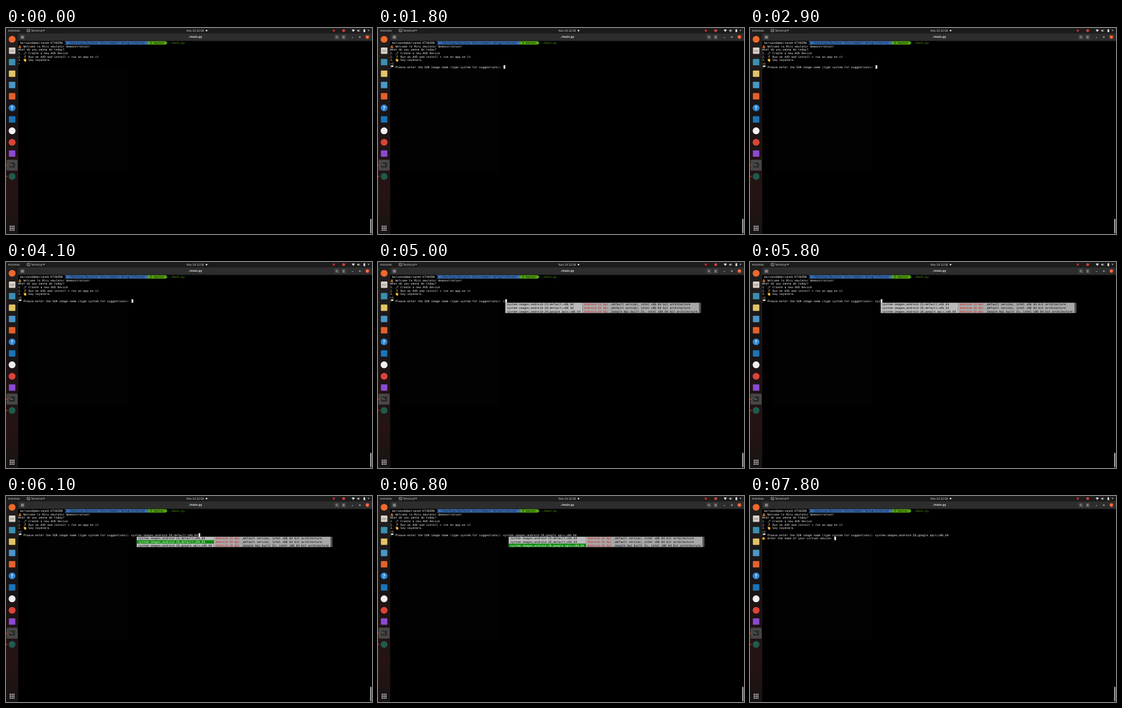
An HTML page that plays this animation: 600 px wide and 338 px high, repeating every 8000 ms.

```html
<!DOCTYPE html>
<html lang="en">
<head>
<meta charset="utf-8">
<title>Terminal session</title>
<style>
  html, body { margin: 0; width: 100%; height: 100%; overflow: hidden; background: #000; }
  svg { display: block; width: 600px; height: 338px; }
  text { white-space: pre; text-rendering: geometricPrecision; }
  .ui { font: 4.7px "Open Sans", "Noto Sans", sans-serif; fill: #e6e6e6; }
  .title { font-weight: 700; }
  .help { font: 700 8px "Open Sans", sans-serif; fill: #fff; }
  .term { font: 4.676px "DejaVu Sans Mono", monospace; }
  .line { fill: none; stroke: #ddd; stroke-width: .6; }
</style>
</head>
<body>
<svg viewBox="0 0 600 338">
  <defs>
    <linearGradient id="dock" x2="0" y2="1">
      <stop offset="0" stop-color="#231f1f"/>
      <stop offset=".4" stop-color="#191314"/>
      <stop offset=".8" stop-color="#261313"/>
      <stop offset="1" stop-color="#181313"/>
    </linearGradient>
  </defs>
  <rect width="600" height="338"/>
  <rect x="36" y="66" width="164" height="170" fill="#020203"/>

  <!-- top panel -->
  <rect width="600" height="9" fill="#1c1c1c"/>
  <g class="ui">
    <text x="3.5" y="6">Activities</text>
    <text x="41" y="6">Terminal</text>
    <text x="296" y="6">Nov 24 22:58</text>
  </g>
  <rect class="line" x="34.6" y="2.2" width="4.6" height="4" rx=".5"/>
  <path class="line" d="M35.6 3.3l1 .9-1 .9M37 5.2h1.3"/>
  <path d="M61 3.3h2.6l-1.3 1.9zM593 3.3h2.6l-1.3 1.9z" fill="#ddd"/>
  <circle cx="328.8" cy="4.2" r="1.2" fill="#fff"/>
  <rect x="535.7" y="2.6" width="3.4" height="3.4" rx="1" fill="#c9252d"/>
  <circle cx="553.6" cy="4.3" r="2.3" fill="#db4437"/>
  <path d="M566.8 3.2q2.5-1.8 5 0l-2.5 3.4zM575.8 3.5h1.2l1.4-1.3v4.4L577 5.2h-1.2z" fill="#ddd"/>
  <path class="line" d="M579.3 2.8q1.2 1.5 0 3"/>
  <path d="M586 2.4h.8v-.6h1.2v.6h.8v4.4H586z" fill="#ddd"/>

  <!-- window title bar -->
  <rect x="20" y="9" width="580" height="12.3" fill="#2d2d2d"/>
  <path d="M20 21.1h580" stroke="#171717" stroke-width=".5"/>
  <g fill="#3b3b3b">
    <rect x="22.6" y="10.8" width="8.4" height="8.4" rx="1.2"/>
    <rect x="538.2" y="10.8" width="8.6" height="8.4" rx="1.2"/>
    <rect x="549.2" y="10.8" width="8.6" height="8.4" rx="1.2"/>
  </g>
  <path class="line" d="M25 13.3h3.7v3.5H25zM26.8 14.2v1.8M25.9 15.1h1.8M543.3 15.8l1.4 1.4M551.8 13.5h3.4M551.8 15h3.4M551.8 16.5h3.4M566.7 15.7h2.6M579.2 14h1.8v1.8h-1.8z"/>
  <circle class="line" cx="542.2" cy="14.6" r="1.4"/>
  <circle cx="592.4" cy="14.8" r="3.1" fill="#e0522a"/>
  <path class="line" d="M591.3 13.7l2.2 2.2M593.5 13.7l-2.2 2.2"/>
  <text class="ui title" x="310.3" y="16.4" text-anchor="middle">./main.py</text>

  <!-- dock -->
  <rect y="9" width="20" height="329" fill="url(#dock)"/>
  <rect x="1" y="216" width="18" height="18" rx="1.5" fill="#474444"/>
  <g id="icons"></g>
  <rect x="4.8" y="32" width="10.6" height="10.4" rx="1.2" fill="#d9d2c9"/>
  <path d="M6.5 36h7v3.2h-7z" fill="#b9aea3"/>
  <text class="help" x="10" y="134" text-anchor="middle">?</text>
  <rect x="4.6" y="220" width="11" height="9.8" rx="1.2" fill="#2c2c2c" stroke="#666" stroke-width=".5"/>
  <path class="line" d="M6.3 222.4l1.6 1.3-1.6 1.3M8.6 225.4h2.4"/>
  <path d="M1.2 225.2h.01M1.2 243.5h.01" stroke="#d9431e" stroke-width="1.8" stroke-linecap="round"/>
  <path d="M6.1 325.4h8M6.1 328.5h8M6.1 331.6h8" stroke="#eee" stroke-width="1.8" stroke-dasharray="1.8 1.2"/>

  <rect x="597.3" y="313" width="1.7" height="24" rx=".8" fill="#d0d0d0"/>
  <g id="prompt" class="term"></g>
  <g id="session" class="term"></g>
</svg>
<script>
const LOOP = 8000, CELL = 2.815, ROW = 5.65;
const colX = c => 20 + c * CELL, rowY = r => 21.6 + r * ROW;
const byId = id => document.getElementById(id);

const text = (c, r, s, fill = '#f2f2f2') =>
  `<text x="${colX(c)}" y="${rowY(r) + 4.4}" fill="${fill}">${s.replace(/>/g, '&gt;')}</text>`;
const block = (c, r, w, fill, h = 1) =>
  `<rect x="${colX(c)}" y="${rowY(r)}" width="${w * CELL}" height="${h * ROW}" fill="${fill}"/>`;
const arrow = (c, r, fill) =>
  `<path d="M${colX(c)} ${rowY(r)}l${CELL} ${ROW / 2}l${-CELL} ${ROW / 2}z" fill="${fill}"/>`;
// Small pictogram on a 5.6 unit square
const glyph = (c, r, body) => `<g transform="translate(${colX(c)} ${rowY(r)})">${body}</g>`;
const fill = (d, color) => `<path d="${d}" fill="${color}"/>`;
const stroke = (d, color, w) =>
  `<path d="${d}" fill="none" stroke="${color}" stroke-width="${w}" stroke-linecap="round"/>`;

// Dock launchers: shape, centre y, colour
byId('icons').innerHTML = [
  ['o', 18.5, '#ee6a2c'], ['s', 56, '#3a8fb0'], ['s', 75, '#e3c468'], ['s', 93.5, '#4a97c9'],
  ['s', 112, '#e2622b'], ['o', 131, '#2f86d4'], ['s', 150, '#1a74b8'], ['o', 168.7, '#f0f0f0'],
  ['o', 187.5, '#db4437'], ['s', 206, '#8b4ad0'], ['o', 243.5, '#1f5a4c']
].map(([shape, y, color]) => shape === 'o'
  ? `<circle cx="10" cy="${y}" r="5.6" fill="${color}"/>`
  : `<rect x="4.7" y="${y - 5.3}" width="10.6" height="10.6" rx="1" fill="${color}"/>`).join('');

const BLUE = '#3a70b8', GREEN = '#55a510';
byId('prompt').innerHTML =
  text(1, 0, 'morvanek@morvanek-KT482RN') +
  block(27, 0, 48, BLUE) + arrow(27, 0, '#000') +
  text(29, 0, '~/Desktop/Emulator-Environment-Setup/internal', '#0a0a0a') +
  block(75, 0, 11, GREEN) + arrow(75, 0, BLUE) + arrow(86, 0, GREEN) +
  glyph(77, 0, stroke('M.7 1v3.6M2.2 1.4v.8l-1.5 1.2', '#0a0a0a', .5)) +
  text(79, 0, 'master', '#0a0a0a') + text(88, 0, './main.py', GREEN) +
  glyph(0, 1, fill('M2.8.2L5.4 5.3H.2z', '#d9862e') + fill('M2 2.2h1.6v1.4H2z', '#a33b2a')) +
  text(3, 1, 'Welcome to Mini emulator demonstration!') +
  text(0, 2, 'What do you wanna do today?') +
  text(0, 3, '1.    Create a new AVD Device') +
  glyph(3, 3, stroke('M1 4.7L3.8 1.7M3.4 1l1.4 1.3', '#a9b0b5', .9)) +
  text(0, 4, '2.    Run an AVD and install + run an app on it') +
  glyph(3, 4, `<circle cx="3" cy=".9" r=".7" fill="#e6b64c"/>` +
    stroke('M2.8 1.9v1.5l1 1.6M2.8 3.4L1.6 4.8M1.7 2.5h2.2', '#c98d3e', .6)) +
  text(0, 5, '3.    Say sayonara.') +
  glyph(3, 5, fill('M.6 1l1-.5 1.2 1.1.7-.9.8.4.7 2.4-.8 1.7-1.6.2-1.6-1.6z', '#f3c036')) +
  text(0, 6, '>');

const choices = [['23', 'default'], ['28', 'default'], ['28', 'google_apis']].map(([api, kind]) => ({
  name: `system-images;android-${api};${kind};x86_64`,
  label: `Android-${api} Api`,
  note: `,${kind === 'default' ? 'default version' : 'Google Api built In'}, intel x86 64 bit architecture`
}));

function menu(col, selected) {
  const rows = choices.map(({ name, label, note }, i) => {
    const r = 8 + i, on = i === selected;
    return (on ? block(col, r, 45, '#0b8a0b') : '') + text(col + 1, r, name, on ? '#fff' : '#000') +
      text(col + 46, r, label, '#d01c1c') + text(col + 61, r, note, '#000');
  });
  return block(col, 8, 45, '#bbb', 3) + block(col + 45, 8, 68, '#a8a8a8', 3) +
    block(col + 113, 8, 1, '#555', 3) + rows.join('');
}

const QUESTION = 'Please enter the SDK image name (type system for suggestions): ';
const NEXT = 'Enter the name of your virtual device: ';
const typing = [[5000, 's'], [5200, 'sy'], [5400, 'sys'],
  [5900, choices[0].name], [6100, choices[1].name], [6300, choices[2].name]];
const cursorOn = [[300, 1400], [1700, 2300], [2900, 3500], [4100, 4700], [5000, 6800], [7000, LOOP]];

function session(t) {
  let out = '', cursor = [1, 6];
  if (t >= 900) {
    out += text(1, 6, '1');
    cursor = [2, 6];
  }
  if (t >= 1700) {
    const step = typing.filter(([at]) => t >= at).length;
    const input = step ? typing[step - 1][1] : '';
    out += glyph(0, 7, fill('M1.2.2h4.1v2.6H1.2z', '#d5d8da') + stroke('M1.1.3v4.9', '#9a8b78', .6)) +
      text(3, 7, QUESTION + input);
    cursor = [66 + input.length, 7];
    if (step && t < 7000) out += menu(66 + Math.min(step, 3), step - 4);
  }
  if (t >= 7000) {
    out += glyph(0, 8, fill('M.3 1.7l1.8-.9 1.2.8h2.1v1H3.8l.2 1.7-1 .7H1.2L.3 4z', '#f2b32f')) +
      text(3, 8, NEXT);
    cursor = [3 + NEXT.length, 8];
  }
  if (cursorOn.some(([a, b]) => t >= a && t < b)) out += block(...cursor, 1, '#f4f4f4');
  return out;
}

let shown;
function draw() {
  const next = session(performance.now() % LOOP);
  if (next !== shown) byId('session').innerHTML = shown = next;
  requestAnimationFrame(draw);
}
draw();
</script>
</body>
</html>
```
